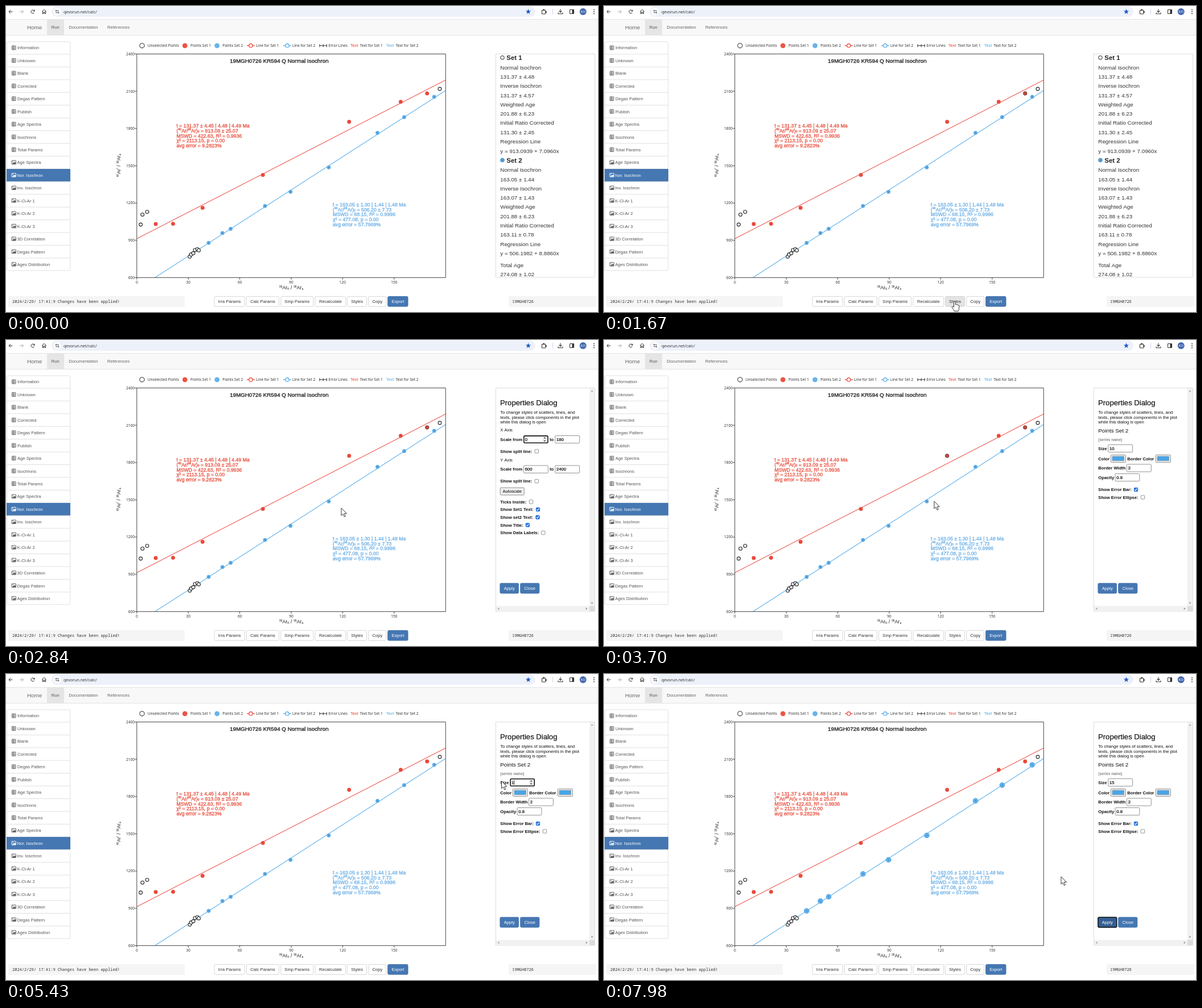
An HTML page with a canvas for the animation above (8 s loop, 1040 by 539 pixels).

```html
<!DOCTYPE html>
<html lang="en">
<head>
<meta charset="utf-8">
<title>Isochron plot</title>
<style>
html, body { margin: 0; width: 100%; height: 100%; overflow: hidden; background: #fff; }
canvas { display: block; width: 1040px; height: 539px; }
</style>
</head>
<body>
<canvas id="stage"></canvas>
<script>
const W = 1040, H = 539, LOOP = 8000;
const canvas = document.getElementById('stage');
const dpr = window.devicePixelRatio || 1;
canvas.width = W * dpr;
canvas.height = H * dpr;
const c = canvas.getContext('2d');

const ARIAL = '"Liberation Sans", Arial, sans-serif';
const NOTO = '"Noto Sans", "Open Sans", sans-serif';
const MONO = '"Noto Sans Mono", "DejaVu Sans Mono", monospace';
const RED = '#e8392d', BLUE = '#48a6e8', PRIMARY = '#4577b2', BASE = 7.64;
const SAMPLE = '19MGH0726';

// ---------- helpers ----------
// y is the middle of the capital letters
function text(s, x, y, { size = BASE, color = '#333', font = ARIAL, weight = 400, align = 'left', edge = 0 } = {}) {
  c.font = `${weight} ${size}px ${font}`;
  c.textAlign = align;
  c.fillStyle = color;
  c.fillText(s, x, y + size * 0.36);
  if (edge) {
    c.strokeStyle = color;
    c.lineWidth = edge;
    c.strokeText(s, x, y + size * 0.36);
  }
}

// ^..^ is raised, _.._ is lowered
function rich(s, x, y, size, color, edge, centered) {
  const parts = s.split(/(\^[^^]*\^|_[^_]*_)/).filter(Boolean).map(p => {
    const shift = p[0] === '^' ? -0.3 : p[0] === '_' ? 0.2 : 0;
    const px = shift ? size * 0.6 : size;
    const str = shift ? p.slice(1, -1) : p;
    c.font = `400 ${px}px ${ARIAL}`;
    return { str, px, dy: shift * size, w: c.measureText(str).width };
  });
  if (centered) x -= parts.reduce((sum, p) => sum + p.w, 0) / 2;
  for (const p of parts) {
    text(p.str, x, y + p.dy, { size: p.px, color, edge });
    x += p.w;
  }
}

// the border of a filled box lies inside its edges
function box(x, y, x2, y2, fill, stroke, r = 0, lw = 0.8) {
  const d = fill && stroke ? lw / 2 : 0;
  c.beginPath();
  c.roundRect(x + d, y + d, x2 - x - 2 * d, y2 - y - 2 * d, r);
  paint(fill, stroke, lw);
}

function paint(fill, stroke, lw = 1) {
  if (fill) { c.fillStyle = fill; c.fill(); }
  if (stroke) { c.strokeStyle = stroke; c.lineWidth = lw; c.stroke(); }
}

function dot(x, y, r, fill, stroke, lw) {
  c.beginPath();
  c.arc(x, y, r, 0, 7);
  paint(fill, stroke, lw);
}

function line(color, lw, ...p) {
  c.beginPath();
  for (let i = 0; i < p.length; i += 2) c.lineTo(p[i], p[i + 1]);
  paint(null, color, lw);
}

function poly(fill, ...p) {
  c.beginPath();
  for (let i = 0; i < p.length; i += 2) c.lineTo(p[i], p[i + 1]);
  c.closePath();
  paint(fill);
}

const clamp = v => Math.max(0, Math.min(1, v));
const ease = v => v * v * (3 - 2 * v);
const inside = (p, x, y, x2, y2) => p.x >= x && p.x <= x2 && p.y >= y && p.y <= y2;

// ---------- pointer ----------
const track = [
  [190, 974, 541], [960, 791, 425], [1000, 790, 426], [1640, 616, 520],
  [1950, 616, 520], [2700, 591, 300], [2840, 589, 296], [3300, 568, 285],
  [3650, 568, 285], [3700, 580, 284], [4440, 904, 191], [4490, 904, 191],
  [4850, 870.5, 188.5], [6190, 870.5, 188.5], [6970, 874, 432],
  [7770, 874, 432], [7980, 803, 357]
];

function pointerAt(t) {
  if (t < track[0][0]) return { x: 974, y: 560 };
  let i = 0;
  while (i < track.length - 2 && t > track[i + 1][0]) i++;
  const [t0, x0, y0] = track[i], [t1, x1, y1] = track[i + 1];
  const k = ease(clamp((t - t0) / (t1 - t0)));
  return { x: x0 + (x1 - x0) * k, y: y0 + (y1 - y0) * k };
}

const ARROW = new Path2D('M0 0V13.2L3.1 10.4L5.3 15.4L7.4 14.5L5.3 9.6H9.4Z');
const HAND = new Path2D('M-1.4 10V1.2Q0 -.8 1.4 1.2V6Q2.8 5 4 6.4Q5.4 5.6 6.2 7Q7.6 6.6 7.9 8.2V12Q7.8 14.5 6.4 17.3H-.8Q-1.6 15 -4.3 11.4Q-5.4 9.4 -3.6 9Q-2.3 9.1 -1.4 10.6Z');
const BEAM = new Path2D('M-2 -5H2M0 -5V5M-2 5H2');

function drawPointer(p, t) {
  const overLink = inside(p, 599, 511, 634, 530) || (t > 1950 && inside(p, 867, 428, 901, 447)) ||
    Math.hypot(p.x - 567, p.y - 284) < 5;
  const overField = t > 3500 && inside(p, 886, 184, 929, 198);
  c.save();
  c.translate(p.x, p.y);
  c.lineJoin = 'round';
  c.strokeStyle = '#222';
  c.lineWidth = 0.9;
  if (overField) c.stroke(BEAM);
  else {
    const shape = overLink ? HAND : ARROW;
    c.fillStyle = '#fff';
    c.fill(shape);
    c.stroke(shape);
  }
  c.restore();
}

// ---------- browser bar and navigation ----------
function drawBrowser() {
  box(80, 1, 930, 19, '#edf1fa', null, 9);
  const ink = '#333';
  line(ink, 1, 11.5, 10, 5, 10);
  line(ink, 1, 8, 7, 5, 10, 8, 13);
  line('#aaa', 1, 24, 10, 30.5, 10);
  line('#aaa', 1, 27.5, 7, 30.5, 10, 27.5, 13);
  c.beginPath();
  c.arc(47, 10, 3, 0.5, 5.6);
  paint(null, ink, 1);
  poly(ink, 50.6, 6.2, 50.6, 9.4, 47.4, 9.4);
  line(ink, 1, 63.5, 9.5, 67, 6.3, 70.5, 9.5);
  line(ink, 1, 64.3, 9, 64.3, 13.5, 66, 13.5, 66, 10.8, 68, 10.8, 68, 13.5, 69.7, 13.5, 69.7, 9);
  dot(90, 10, 6.5, '#fff');
  line(ink, 0.9, 90, 8.3, 93, 8.3);
  line(ink, 0.9, 87, 11.7, 90, 11.7);
  dot(88.2, 8.3, 1, null, ink, 0.9);
  dot(91.8, 11.7, 1, null, ink, 0.9);
  text('qevorun.net/calc/', 101, 10, { size: 7.1, font: NOTO });

  c.beginPath();
  for (let i = 0; i < 10; i++) {
    const r = i % 2 ? 2 : 4.9, a = i * Math.PI / 5 - Math.PI / 2;
    c.lineTo(917.5 + r * Math.cos(a), 10 + r * Math.sin(a));
  }
  paint('#1a56c4');
  box(941.5, 7.5, 948, 14, null, ink, 0.8, 1.1);
  dot(944.7, 6.8, 1.4, ink);
  dot(948.6, 10.7, 1.4, ink);
  line('#c8d6f0', 1, 960.5, 5, 960.5, 15);
  line(ink, 1.1, 974, 5.5, 974, 11);
  line(ink, 1.1, 971.5, 8.7, 974, 11.2, 976.5, 8.7);
  line(ink, 1.1, 970, 11.5, 970, 13.7, 978, 13.7, 978, 11.5);
  box(990.5, 6.5, 997.5, 13.5, null, ink, 0.8, 1.1);
  box(994.5, 6.5, 997.5, 13.5, ink);
  dot(1013.7, 10, 6, '#4568ae');
  text('KO', 1013.7, 10, { size: 5.5, color: '#fff', align: 'center' });
  for (const y of [6.5, 10, 13.5]) dot(1033, y, 0.9, ink);

  box(0, 23, W, 51, '#f8f8f8');
  line('#e4e4e4', 1, 0, 23.5, W, 23.5);
  line('#e4e4e4', 1, 0, 51.5, W, 51.5);
  box(72, 24, 102, 51, '#e5e5e5');
  text('Home', 37, 37.3, { size: 9.82, color: '#666' });
  text('Run', 79.7, 37.3, { color: '#555' });
  text('Documentation', 110.3, 37.3, { color: '#666' });
  text('References', 178, 37.3, { color: '#666' });
}

const MENU = ['Information', 'Unknown', 'Blank', 'Corrected', 'Degas Pattern', 'Publish', 'Age Spectra',
  'Isochrons', 'Total Params', 'Age Spectra', 'Nor. Isochron', 'Inv. Ioschron', 'K-Cl-Ar 1', 'K-Cl-Ar 2',
  'K-Cl-Ar 3', '3D Correlation', 'Degas Pattern', 'Ages Distribution'];

function drawMenu() {
  const row = 22.44, top = 62.5;
  box(1, top, 113.2, top + row * MENU.length, '#fff', '#ddd', 2, 0.9);
  MENU.forEach((name, i) => {
    const y = top + row * i, mid = y + row / 2, on = i === 10;
    const ink = on ? '#fff' : '#555';
    if (i) line('#ddd', 0.9, 1.5, y, 113, y);
    if (on) box(1, y, 113, y + row, PRIMARY);
    if (i < 9) {
      box(10.5, mid - 3.7, 17, mid + 3.3, null, ink, 0.5, 0.9);
      line(ink, 0.7, 12.8, mid - 3.5, 12.8, mid + 3.2);
      for (const d of [-1.8, 0, 1.7]) line(ink, 0.8, 11.5, mid + d, 16, mid + d);
    } else {
      box(10, mid - 3.5, 17.5, mid + 3, null, ink, 0.5, 0.9);
      poly(ink, 10.8, mid + 2.4, 12.8, mid - 0.2, 13.8, mid + 0.8, 15.2, mid - 1.4, 16.8, mid + 0.6, 16.8, mid + 2.4);
      dot(12.2, mid - 1.7, 0.8, ink);
    }
    text(name, i < 9 ? 20 : 19.5, mid, { color: ink });
  });
}

function button(label, x, x2, y, y2, fill, ink = '#333', stroke = '#ccc') {
  box(x, y, x2, y2, fill, stroke, 2, 0.8);
  text(label, (x + x2) / 2, (y + y2) / 2, { color: ink, align: 'center' });
}

function drawFooter(p) {
  box(4, 511, 314, 530, '#f5f5f5', null, 2);
  box(883, 511, 1037, 530, '#f5f5f5', null, 2);
  text('2024/2/29/ 17:41:9 Changes have been applied!', 11, 520.3, { size: 7, font: MONO });
  text(SAMPLE, 889, 520.3, { size: 7, font: MONO });
  const hover = inside(p, 599, 511, 634, 530);
  [['Irra Params', 365.7, 419.7], ['Calc Params', 422, 480], ['Smp Params', 482.4, 540.3], ['Recalculate', 542.7, 597.2],
    ['Styles', 599.3, 634], ['Copy', 636.4, 668.2]].forEach(([s, x, x2]) =>
    button(s, x, x2, 511.2, 529.7, s === 'Styles' && hover ? '#e4e4e4' : '#fff'));
  button('Export', 670.3, 706.5, 511.2, 529.7, PRIMARY, '#fff', '#3f70aa');
}

// ---------- plot ----------
const L = 229.8, R = 772.3, TOP = 84.5, BOTTOM = 478.4;
const px = v => L + v * (R - L) / 180;
const py = v => BOTTOM - (v - 600) * (BOTTOM - TOP) / 1800;

const redPts = [[263, 384], [293.5, 383.6], [345.3, 355.5], [451.3, 297.6], [602.8, 204], [693.4, 168.8], [739.8, 154]];
const bluePts = [[356, 417.3], [380.2, 399.9], [394.7, 392.4], [455, 352.2], [499.8, 327.3], [567, 284.3],
  [652.6, 223.4], [699.5, 195.8], [752.2, 160]];
const freePts = [[236.6, 385], [239.7, 367.4], [248, 362.6], [322.8, 441.4], [325, 437.8], [329, 435.5],
  [332, 429.9], [336.2, 428.4], [338.6, 430.4], [762, 146]];

function drawLegend() {
  const y = 69.8, opt = { size: 6.55, font: NOTO };
  dot(239, y, 4.1, '#fff', '#333', 1.1);
  dot(314.3, y, 4.4, '#ee5345');
  dot(370.7, y, 4.4, '#66b3ea');
  [[430, RED], [494, BLUE]].forEach(([x, col]) => {
    line(col, 1.2, x - 7, y, x + 7, y);
    dot(x, y, 3.2, '#fff', col, 1.2);
  });
  line('#333', 1, 550.5, y, 564, y);
  for (const x of [551, 557.3, 563.5]) line('#333', 1, x, y - 2.6, x, y + 2.6);
  text('Text', 605, y, { size: 7.4, color: RED });
  text('Text', 667.7, y, { size: 7.4, color: BLUE });
  [['Unselected Points', 248.7], ['Points Set 1', 324], ['Points Set 2', 380.2], ['Line for Set 1', 439.3],
    ['Line for Set 2', 503], ['Error Lines', 566.5], ['Text for Set 1', 621.7], ['Text for Set 2', 684.5]]
    .forEach(([s, x]) => text(s, x, y, opt));
}

function drawNote(x, y, color, lines) {
  lines.forEach((s, i) => rich(s, x, y + i * 8.73, 8.73, color, 0.32));
}

function drawPlot(t) {
  drawLegend();
  const label = { size: 6.55, font: NOTO };
  for (let v = 600; v <= 2400; v += 300) {
    line('#333', 0.9, L - 3.5, py(v), L, py(v));
    text(v, 226, py(v), { ...label, align: 'right' });
  }
  for (let v = 0; v < 180; v += 30) {
    line('#333', 0.9, px(v), BOTTOM, px(v), BOTTOM + 3.5);
    text(v, px(v), 486.8, { ...label, align: 'center' });
  }
  rich('^39^Ar_K_ / ^36^Ar_a_', 501, 496.3, 8.73, '#222', 0, true);
  c.save();
  c.translate(198.3, 281);
  c.rotate(-Math.PI / 2);
  rich('^40^Ar^*^ / ^36^Ar_a_', 0, 0, 8.73, '#222', 0, true);
  c.restore();

  line(RED, 1.1, L, py(913.0939), R, py(913.0939 + 7.096 * 180));
  line(BLUE, 1.1, px((600 - 506.1982) / 8.886), BOTTOM, R, py(506.1982 + 8.886 * 180));
  box(L, TOP, R, BOTTOM, null, '#333', 0, 0.9);

  redPts.forEach(([x, y], i) => {
    const lit = (i === 6 && t > 1150 && t < 4150) || (i === 4 && t > 3300 && t < 4000);
    dot(x, y, 3.2, lit ? '#d0463a' : '#ec4839', lit ? '#5c3634' : '#e23a2e', lit ? 0.9 : 0.5);
  });
  const grow = ease(clamp((t - 7230) / 330));
  for (const [x, y] of bluePts) {
    dot(x, y, 3.2 + 1.4 * grow, '#60b0ea', '#50a4e2', 0.5);
    dot(x, y, 1.1, 'rgba(35,110,175,.65)');
  }
  for (const [x, y] of freePts) dot(x, y, 2.9, '#fff', '#262626', 1.1);

  text(SAMPLE + ' KR594 Q Normal Isochron', 480, 96.7, { size: 9.82, color: '#222', align: 'center', edge: 0.35 });
  drawNote(299.5, 210.9, '#e9503f', ['t = 131.37 ± 4.45 | 4.48 | 4.49 Ma', '(^40^Ar/^36^Ar)_0_ = 913.09 ± 25.07',
    'MSWD = 422.63, R² = 0.9936', 'χ² = 2113.15, p = 0.00', 'avg error = 9.2823%']);
  drawNote(574, 349.8, '#6aafe6', ['t = 163.05 ± 1.30 | 1.44 | 1.48 Ma', '(^40^Ar/^36^Ar)_0_ = 506.20 ± 7.73',
    'MSWD = 68.15, R² = 0.9996', 'χ² = 477.08, p = 0.00', 'avg error = 57.7969%']);
}

// ---------- right panel ----------
function drawResults() {
  const heads = ['Normal Isochron', 'Inverse Isochron', 'Weighted Age', 'Initial Ratio Corrected', 'Regression Line'];
  const sets = [
    ['131.37 ± 4.48', '131.37 ± 4.57', '201.88 ± 6.23', '131.30 ± 2.45', 'y = 913.0939 + 7.0960x'],
    ['163.05 ± 1.44', '163.07 ± 1.43', '201.88 ± 6.23', '163.11 ± 0.78', 'y = 506.1982 + 8.8860x']];
  const big = { size: 9.82 };
  sets.forEach((vals, i) => {
    const y = 90.9 + i * 180.6;
    dot(872, y, 3.3, i ? '#7cc0ee' : '#fff', i ? '#2a6da8' : '#222', 1);
    if (i) dot(872, y, 1.5, '#2f7fc0');
    text('Set ' + (i + 1), 879.3, y, { size: 11.4, weight: 700, color: '#222' });
    vals.forEach((v, k) => {
      text(heads[k], 868.3, y + 17.1 + k * 32.65, big);
      text(v, 868.3, y + 33.5 + k * 32.65, big);
    });
  });
  text('Total Age', 868.3, 456.6, big);
  text('274.08 ± 1.02', 868.3, 472.4, big);
}

const bold = (s, y, x = 868.3) => text(s, x, y, { weight: 700, color: '#111' });

function field(x, y, value, focus) {
  box(x, y - 7, x + 43.7, y + 7, '#fff', focus ? '#111' : '#767676', 1.5, focus ? 1.6 : 0.8);
  text(value, x + 2.7, y, { color: '#000', edge: 0.2 });
  if (focus) {
    const sx = x + 37.3;
    box(sx - 3.5, y - 5, sx + 3.8, y + 5, '#efefef');
    poly('#444', sx - 2, y - 1.6, sx, y - 4, sx + 2, y - 1.6);
    poly('#444', sx - 2, y + 1.6, sx, y + 4, sx + 2, y + 1.6);
  }
}

function check(x, y, on) {
  box(x - 3.6, y - 3.6, x + 3.6, y + 3.6, on ? '#1f6fe0' : '#fff', on ? '#1f6fe0' : '#767676', 1, 0.8);
  if (on) line('#fff', 1.1, x - 2, y, x - 0.6, y + 1.6, x + 2.1, y - 1.8);
}

function swatch(x) {
  box(x, 202, x + 26.8, 215.8, '#efefef', '#767676', 1, 0.8);
  box(x + 2.8, 204.7, x + 23.7, 212.8, BLUE, '#777', 0, 0.5);
}

function drawAxisForm() {
  text('X Axis', 868.3, 158.3, { color: '#111' });
  text('Y Axis', 868.3, 211, { color: '#111' });
  [[175.1, '0', '180', true], [227.7, '600', '2400', false]].forEach(([y, from, to, focus]) => {
    bold('Scale from', y);
    field(909, y, from, focus);
    bold('to', y, 955);
    field(964.3, y, to);
    bold('Show split line:', y + 20.9);
    check(932.3, y + 20.9, false);
  });
  box(867.8, 259.7, 910.7, 273.5, '#efefef', '#767676', 1.5);
  text('Autoscale', 889.2, 266.6, { color: '#000', align: 'center' });
  [['Ticks Inside:', 285, 922.5, false], ['Show Set1 Text:', 298.5, 934.5, true], ['Show set2 Text:', 312.2, 934, true],
    ['Show Title:', 325.9, 916.3, true], ['Show Data Labels:', 339.5, 943.7, false]].forEach(([s, y, x, on]) => {
    bold(s, y);
    check(x, y, on);
  });
}

function drawSeriesForm(t, p) {
  text('Points Set 2', 868.3, 159.4, { size: 9.82, color: '#111' });
  text('(series name)', 868.3, 175.7, { size: 6.55, weight: 700, color: '#888' });
  bold('Size', 191);
  const focus = t >= 4480 && t < 7210;
  const value = t < 5430 ? '10' : t < 5670 ? '1' : '15';
  field(885.3, 191, value, focus);
  if (focus) {
    const end = 888 + value.length * 4.25;
    if (t >= 5430) line('#000', 0.8, end + 0.4, 187, end + 0.4, 195);
    else {
      const from = Math.max(888, Math.min(end, p.x));
      if (from < end) {
        box(from, 186.5, end, 195.5, '#2f6fd0');
        c.save();
        c.beginPath();
        c.rect(from, 186, end - from, 10);
        c.clip();
        text(value, 888, 191, { color: '#fff' });
        c.restore();
      }
    }
  }
  bold('Color', 209.4);
  swatch(890);
  bold('Border Color', 209.4, 919.3);
  swatch(969);
  bold('Border Width', 225.5);
  field(918, 225.5, '2');
  bold('Opacity', 242.1);
  field(897.6, 242.1, '0.8');
  bold('Show Error Bar:', 263.5);
  check(934.5, 263.5, true);
  bold('Show Error Ellipse:', 277);
  check(946.5, 277, false);
}

function drawDialog(t, p) {
  box(1025, 85, 1034, 478, '#f1f1f1');
  box(861, 468.5, 1034, 478, '#f1f1f1');
  box(1025, 468.5, 1034, 478, '#dcdcdc');
  poly('#999', 1027.5, 91, 1029.5, 88.5, 1031.5, 91);
  poly('#888', 1027.5, 462.3, 1029.5, 464.8, 1031.5, 462.3);
  poly('#999', 866.3, 471.2, 863.8, 473.2, 866.3, 475.2);
  poly('#888', 1018.8, 471.2, 1021.3, 473.2, 1018.8, 475.2);

  text('Properties Dialog', 868, 110.5, { size: 13.1, color: '#111', edge: 0.2 });
  ['To change styles of scatters, lines, and', 'texts, please click components in the plot', 'while this dialog is open']
    .forEach((s, i) => text(s, 868.3, 127.4 + i * 8.4, { color: '#111' }));
  if (t < 3430) drawAxisForm();
  else drawSeriesForm(t, p);

  const pressed = t >= 7020;
  button('Apply', 867.5, 901, 428, 446.6, pressed ? '#355f92' : PRIMARY, '#fff', '#3f70aa');
  if (t >= 7210) box(868, 428.6, 900.7, 446.2, null, '#111', 2, 1.5);
  button('Close', 903.2, 937.3, 428, 446.6, PRIMARY, '#fff', '#3f70aa');
}

function drawPanel(t, p) {
  box(860, 84, 1035, 478.5, '#fff', '#ddd', 0, 1);
  if (t < 1950) drawResults();
  else drawDialog(t, p);
}

// ---------- loop ----------
const start = performance.now();

function frame() {
  const t = (performance.now() - start) % LOOP;
  const p = pointerAt(t);
  c.setTransform(dpr, 0, 0, dpr, 0, 0);
  c.fillStyle = '#fff';
  c.fillRect(0, 0, W, H);
  drawBrowser();
  drawMenu();
  drawPlot(t);
  drawPanel(t, p);
  drawFooter(p);
  drawPointer(p, t);
  requestAnimationFrame(frame);
}
frame();
</script>
</body>
</html>
```
